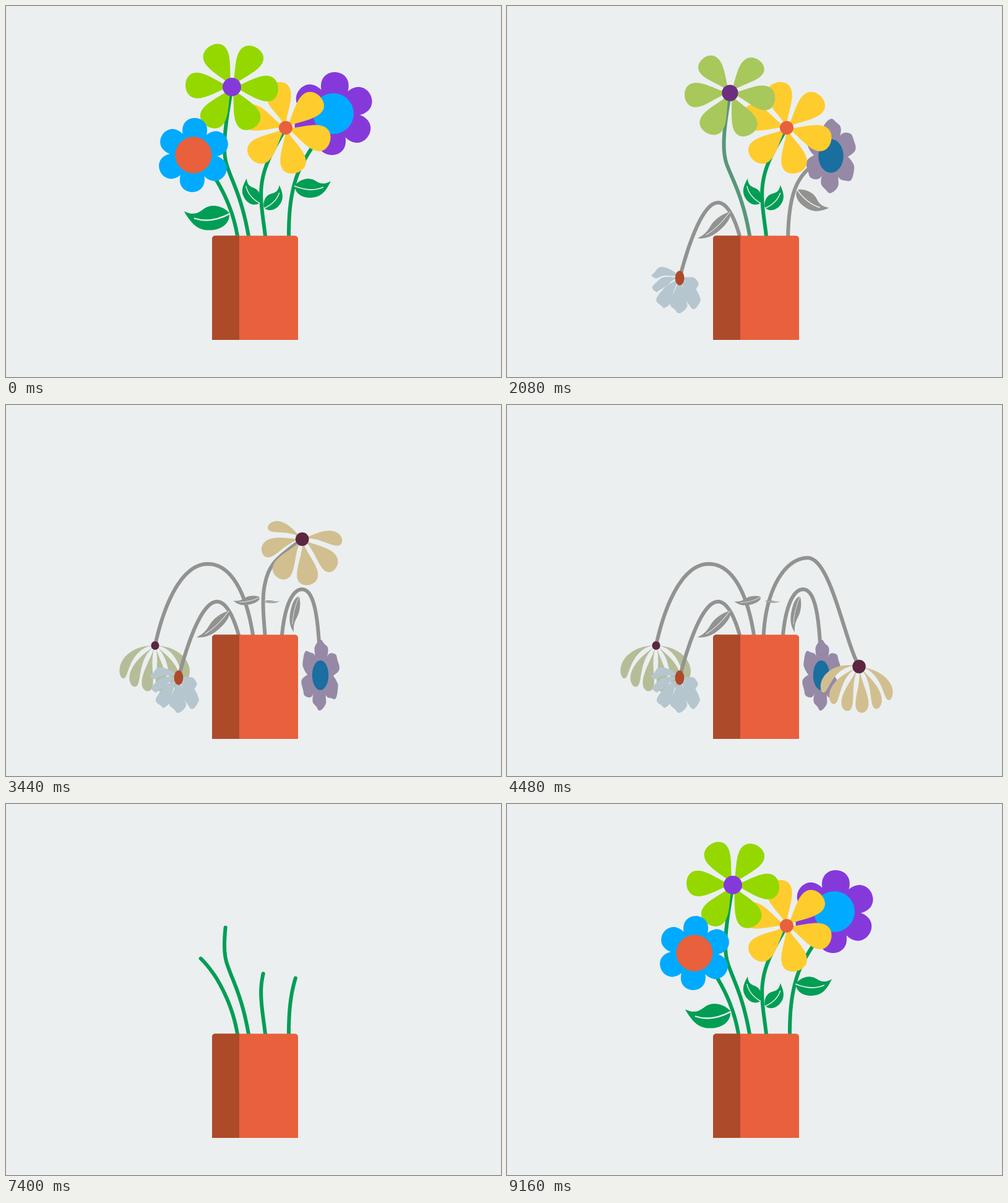
These frames come from a looping animation (800x600 px, 10000 ms). An HTML page with a canvas:

```html
<!DOCTYPE html>
<html lang="en">
<head>
<meta charset="utf-8">
<title>Flower pot</title>
<style>
  html, body { margin: 0; width: 100%; height: 100%; overflow: hidden; background: #ebeff0; }
  canvas { display: block; }
</style>
</head>
<body>
<canvas id="stage" width="800" height="600"></canvas>
<script>
const ctx = document.getElementById('stage').getContext('2d');
const LOOP = 10000, REGROW = 6560;
const BG = '#ebeff0', GREEN = '#009e55', GRAY = '#929390', RED = '#e8603c', BROWN = '#ad4a29', PLUM = '#5c2641';
let wiltTime = 0, growTime = LOOP;

const clamp = u => Math.max(0, Math.min(1, u));
const lerp = (a, b, p) => a + (b - a) * p;
const lerpAll = (a, b, p) => a.map((v, i) => lerp(v, b[i], p));
const smooth = u => u * u * (3 - 2 * u);
const outCubic = u => 1 - (1 - u) ** 3;
const outBack = u => u <= 0 ? 0 : 1 + 2.7 * (u - 1) ** 3 + 1.7 * (u - 1) ** 2;
const wilt = ([start, span]) => clamp((wiltTime - start) / span);
const grow = ([start, span]) => clamp((growTime - start) / span);

// Gravity drop with a small overshoot at the end.
function fall([start, span]) {
  const u = (wiltTime - start) / span;
  if (u <= 0) return 0;
  if (u < 1) return u * u;
  return u < 1.12 ? 1 + 0.03 * Math.sin(Math.PI * (u - 1) / 0.12) : 1;
}

function mix(colors, p) {
  const pos = p * (colors.length - 1), i = Math.min(Math.floor(pos), colors.length - 2);
  const rgb = c => [1, 3, 5].map(k => parseInt(c.slice(k, k + 2), 16));
  return `rgb(${lerpAll(rgb(colors[i]), rgb(colors[i + 1]), pos - i).map(Math.round)})`;
}

const long = { length: 75, width: 32, power: 1.5, skew: 2, crinkle: 0 };
const round = { length: 60, width: 26, power: 1, skew: 0, crinkle: 2 };

// Stems hold six points: base, two controls, joint, two controls; the head closes the curve.
const purple = {
  petal: round, size: 1.12, angle: 33, radius: 33, sag: 0, squash: [0.48, 0.83], shrink: [0.4, 0.73],
  head: [529, 174], endHead: [508, 437],
  stem: [457, 372, 457, 325, 462, 300, 469, 278, 480, 245, 506, 215],
  endStem: [446, 372, 450, 330, 461, 299, 478, 298, 500, 298, 506, 350],
  colors: ['#8639db', '#8639db', '#9689a6'], core: ['#00aaff', '#00aaff', '#1a6ea0'],
  fade: [1240, 800], droop: [1400, 1050], dry: [1400, 1050], drop: () => fall([1289, 1550]),
  rise: [7150, 1300], bloom: [8450, 600], stagger: 20, coreGrow: [8450, 600]
};
const yellow = {
  petal: long, size: 1, angle: 16, radius: 11, sag: 1, squash: [1, 1], shrink: [0.97, 1],
  head: [452, 197], endHead: [569, 461],
  stem: [419, 372, 416, 345, 410, 315, 413, 290, 417, 255, 433, 232],
  endStem: [414, 372, 418, 300, 450, 240, 495, 240, 540, 240, 562, 400],
  colors: ['#ffcc2e', '#ecac80', '#d2bf90'], core: [RED, BROWN, PLUM],
  fade: [2160, 800], droop: [2100, 2740], dry: [2100, 2740],
  drop: () => fall([3000, 1600]), swing: () => fall([2900, 1130]),
  rise: [7050, 1400], bloom: [7950, 600], stagger: 20, coreGrow: [7980, 500]
};
const green = {
  petal: long, size: 1, angle: 1, radius: 15, sag: 1, squash: [1, 1], shrink: [0.44, 0.47],
  head: [365, 131], endHead: [241, 389],
  stem: [392, 372, 381, 310, 367, 288, 357, 258, 348, 230, 356, 185],
  endStem: [399, 372, 392, 325, 372, 257, 326, 257, 280, 257, 252, 335],
  colors: ['#94d800', '#b5bd98', '#b5bd98'], core: ['#8639db', PLUM, PLUM],
  fade: [1840, 800], droop: [1920, 800], dry: [1900, 800], drop: () => fall([1800, 1450]),
  rise: [6900, 1300], bloom: [7800, 600], stagger: 40, coreGrow: [7750, 500]
};
const blue = {
  petal: round, size: 1, angle: 33, radius: 29.5, sag: 0.7, squash: [0.95, 0.95], shrink: [0.25, 0.4],
  lengths: [0.9, 1, 0.97, 0.97, 0.62, 1],
  head: [303, 241], endHead: [279, 441],
  stem: [374, 372, 367, 330, 350, 298, 339, 280, 327, 262, 315, 248],
  endStem: [376, 372, 367, 340, 355, 318, 341, 318, 313, 318, 288, 405],
  colors: ['#00aaff', '#87bbd9', '#b6c6cf'], core: [RED, BROWN, BROWN],
  fade: [1080, 800], droop: [1440, 720], dry: [1080, 900],
  drop: () => 1 - (1 - wilt([1060, 1100])) ** 2, bend: p => Math.min(1, p * 1.6),
  rise: [6900, 1100], bloom: [7992, 560], stagger: 4, coreGrow: [8030, 750]
};

// Poses are x, y, rotation in degrees, length scale, thickness scale.
const leaves = {
  blue: { flip: -1, pose: [361, 337, -5, 1.25, 1.27], end: [360, 334, -43, 1.15, 0.55], dry: [1080, 800], fade: [1080, 400], sprout: [7750, 500] },
  purple: { flip: 1, pose: [467, 292, 0, 1, 1], end: [473, 310, 102, 1, 0.45], dry: [1440, 1600], fade: [1080, 400], sprout: [8500, 500] },
  left: { flip: -1, pose: [409, 319, 54, 0.76, 0.8], end: [410, 311, -14, 0.74, 0.42], dry: [2720, 800], fade: [2320, 400], sprout: [7930, 500] },
  right: { flip: 1, pose: [418, 327, -48, 0.75, 0.8], end: [417, 317, 4, 0.42, 0.12], dry: [2720, 800], fade: [2320, 400], sprout: [8240, 500] }
};

function cubic(p, u) {
  const v = 1 - u, at = k => v ** 3 * p[k] + 3 * v * v * u * p[k + 2] + 3 * v * u * u * p[k + 4] + u ** 3 * p[k + 6];
  return [at(0), at(1)];
}

// Draws the stem and returns the position of its end.
function drawStem(f) {
  const p = f.drop(), swing = f.swing ? f.swing() : p;
  const head = [lerp(f.head[0], f.endHead[0], swing), lerp(f.head[1], f.endHead[1], p)];
  const pts = [...lerpAll(f.stem, f.endStem, f.bend ? f.bend(p) : p), ...head];
  const length = outCubic(grow(f.rise));
  if (!length) return head;
  let end;
  ctx.beginPath();
  for (let i = 0; i <= 60; i++) {
    const u = i / 30 * length;
    end = u <= 1 ? cubic(pts, u) : cubic(pts.slice(6), u - 1);
    ctx.lineTo(...end);
  }
  ctx.lineWidth = 6;
  ctx.lineCap = ctx.lineJoin = 'round';
  ctx.strokeStyle = mix([GREEN, GRAY, GRAY], wilt(f.fade));
  ctx.stroke();
  return end;
}

// Sagging petals turn towards the ground; those that turn furthest look shorter and thinner.
function drawPetal(f, i, droop) {
  const shape = f.petal, scale = f.size * outCubic(grow([f.bloom[0] + i * f.stagger, f.bloom[1]]));
  if (!scale) return;
  let fromDown = f.angle + 90 - 60 * i;
  if (fromDown < -170) fromDown += 360;
  const sag = droop * f.sag, tilt = (fromDown / 180) ** 2;
  const ownLength = f.lengths ? lerp(1, f.lengths[i], droop) : 1;
  const stretch = scale * ownLength * (1 - 0.25 * Math.sin(Math.PI * sag) * tilt);
  const thin = scale * Math.max(0.5, 1 - 0.45 * sag * sag - 1.1 * sag * tilt);
  const power = shape.power + 0.6 * sag;
  ctx.beginPath();
  for (let k = 0; k <= 48; k++) {
    const a = k / 48 * 2 * Math.PI, v = (1 - Math.cos(a)) / 2;
    const crease = shape.crinkle * droop * v * Math.sin(5 * a + 2 * i);
    const x = (shape.length * v + crease) * stretch;
    const y = (shape.width * 2 * v ** power * Math.cos(a / 2) + shape.skew * v + crease) * thin;
    const turn = (90 + fromDown * (1 - sag * (0.4 + 0.3 * v))) * Math.PI / 180;
    ctx.lineTo(x * Math.cos(turn) - y * Math.sin(turn), x * Math.sin(turn) + y * Math.cos(turn));
  }
  ctx.fill();
}

function drawHead(f, [x, y]) {
  const droop = smooth(wilt(f.droop)), fade = wilt(f.fade);
  ctx.save();
  ctx.translate(x, y);
  ctx.save();
  ctx.scale(...lerpAll([1, 1], f.squash, droop));
  ctx.fillStyle = mix(f.colors, fade);
  for (let i = 0; i < 6; i++) drawPetal(f, i, droop);
  ctx.restore();
  const r = f.radius * outBack(grow(f.coreGrow));
  const [sx, sy] = lerpAll([1, 1], f.shrink, wilt(f.dry));
  ctx.fillStyle = mix(f.core, fade);
  ctx.beginPath();
  ctx.ellipse(0, 0, r * sx, r * sy, 0, 0, 2 * Math.PI);
  ctx.fill();
  ctx.restore();
}

function drawLeaf(leaf) {
  const size = outBack(grow(leaf.sprout));
  if (!size) return;
  const [x, y, turn, length, thick] = lerpAll(leaf.pose, leaf.end, smooth(wilt(leaf.dry)));
  ctx.save();
  ctx.translate(x, y);
  ctx.rotate(turn * Math.PI / 180);
  ctx.scale(leaf.flip * length * size, thick * size);
  ctx.fillStyle = mix([GREEN, GRAY], wilt(leaf.fade));
  ctx.fill(new Path2D('M0-2C8-12 22-16 32-10C40-5 46-2 58-9C50 8 42 18 24 18C8 18-1 8 0-2Z'));
  ctx.strokeStyle = BG;
  ctx.lineWidth = 1.8;
  ctx.lineCap = 'butt';
  ctx.stroke(new Path2D('M-1-1Q25 10 46 1'));
  ctx.restore();
}

function drawPot() {
  const height = outBack(grow([REGROW, 500]));
  ctx.save();
  ctx.translate(333, 540);
  ctx.scale(1, height);
  ctx.beginPath();
  ctx.roundRect(0, -168.5, 139, 168.5, [5, 5, 0, 0]);
  ctx.clip();
  ctx.fillStyle = RED;
  ctx.fillRect(0, -169, 139, 169);
  ctx.fillStyle = BROWN;
  ctx.fillRect(0, -169, 44, 169);
  ctx.restore();
}

function render(t) {
  wiltTime = t < REGROW ? t : 0;
  growTime = t < REGROW ? LOOP : t;
  ctx.fillStyle = BG;
  ctx.fillRect(0, 0, 800, 600);

  const purpleEnd = drawStem(purple);
  drawLeaf(leaves.purple);
  drawHead(purple, purpleEnd);

  const greenEnd = drawStem(green);
  const yellowEnd = drawStem(yellow);
  drawLeaf(leaves.left);
  drawLeaf(leaves.right);
  drawHead(yellow, yellowEnd);
  drawHead(green, greenEnd);

  const blueEnd = drawStem(blue);
  drawLeaf(leaves.blue);
  drawHead(blue, blueEnd);
  drawPot();
}

const began = performance.now();
function tick() {
  const t = (performance.now() - began) % LOOP;
  render(Math.floor(t / 40) * 40);
  requestAnimationFrame(tick);
}
tick();
</script>
</body>
</html>
```
